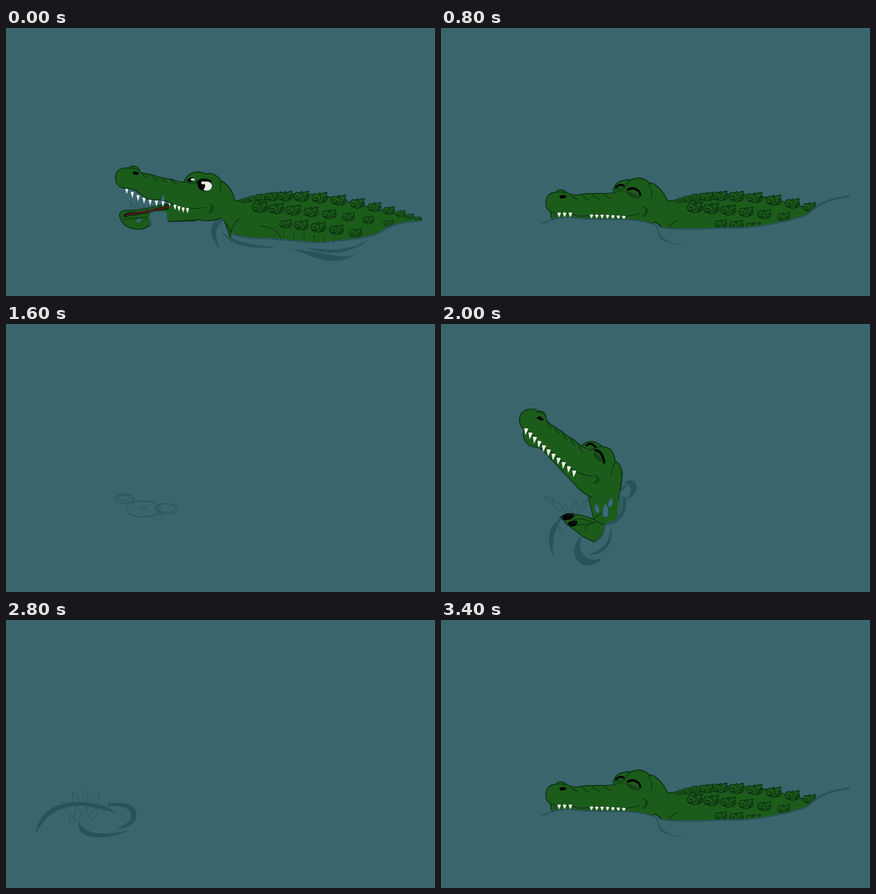
Write an HTML page that moves like this. It is 650 px wide and 406 px high and loops after 3600 ms.

```html
<!DOCTYPE html>
<html lang="en">
<head>
<meta charset="utf-8">
<title>Crocodile</title>
<style>
html, body { margin: 0; width: 100%; height: 100%; overflow: hidden; background: #3a656d; }
svg { display: block; width: 100vw; height: 100vh; }
</style>
</head>
<body>
<svg id="stage" viewBox="0 0 650 406"></svg>
<script>
const WATER = '#3a656d', WAVE = '#285359', SKIN = '#1c5c1a', INK = '#0b3013', DROP = '#3e6b7b';
const STEP = 200;

const shape = (d, fill = SKIN, stroke = 'none', w = 1.3) =>
  `<path d="${d}" fill="${fill}" stroke="${stroke}" stroke-width="${w}" stroke-linejoin="round" stroke-linecap="round"/>`;
const skin = d => shape(d, SKIN, INK, 1.4);
const line = (d, w = 1.1, color = INK) => shape(d, 'none', color, w);
const wave = d => shape(d, WAVE);
const move = (t, s) => `<g transform="${t}">${s}</g>`;
const blob = (x, y, rx, ry, fill, r = 0) =>
  `<ellipse cx="${x}" cy="${y}" rx="${rx}" ry="${ry}" fill="${fill}" transform="rotate(${r} ${x} ${y})"/>`;

// Places n parts along the curve from a to b that bends towards c
const even = t => t;
const bunched = t => t - 0.08 * Math.sin(2 * Math.PI * t);
function row(n, a, c, b, part, ease = even) {
  let out = '';
  for (let i = 0; i < n; i++) {
    const t = i / (n - 1), u = ease(t);
    const at = k => (1 - u) ** 2 * a[k] + 2 * u * (1 - u) * c[k] + u * u * b[k];
    out += part(at(0), at(1), t, i);
  }
  return out;
}
const bulge = (ends, mid) => t => ends + (mid - ends) * Math.sin(Math.PI * t);

// Drops are 20 units long and point upwards
const drop = fill => (x, y, s = 1, r = 0) =>
  move(`translate(${x} ${y}) rotate(${r}) scale(${s})`,
    shape('M0,-10C4,-4 5,2 4,6C3,11 -3,11 -4,6C-5,2 -3,-4 0,-10Z', fill, WAVE, 0.9 / s));
const wet = drop(DROP), clear = drop('none');
const fan = (kind, size, r0, r1) => (x, y, t, i) => kind(x, y, size * (i % 2 ? 1.25 : 0.9), r0 + (r1 - r0) * t);

const tooth = (w, h, r = 0) => (x, y) =>
  move(`translate(${x} ${y}) rotate(${r})`, shape(`M${-w / 2},-2Q0,-3 ${w / 2},-2L0,${h}Z`, '#eef0e8'));
const fold = (dx, dy) => (x, y) => line(`M${x},${y}q${dx * 0.3},${dy * 0.8} ${dx},${dy}`);

const plate = (x, y, s, r = 0) =>
  move(`translate(${x} ${y}) rotate(${r}) scale(${s})`,
    skin('M-12,0C-11,-6 -7,-8 -3,-5L0,-8L2,-5Q5,-8 11,-8L9,-4C14,1 10,7 2,7Q-1,9 -5,6Q-10,7 -12,0Z') +
    line('M-9,4Q-5,5 -3,1Q-6,-2 -9,0M-3,-5Q3,-3 2,1Q0,5 -5,5M3,5Q9,5 9,-3M5,3Q7,1 6,-2', 1.4));
const plates = (size, r = 0) => (x, y, t) => plate(x, y, size(t), r);

// Floating back, seen from the side
const back =
  skin('M344,262C365,260 385,256 405,254C430,250 460,250 490,256C525,264 560,275 600,284Q615,287 629,288Q631,291 628,293L590,330L350,345L330,290') +
  row(15, [358, 262], [460, 239], [624, 289], plates(bulge(.4, 1)), bunched) +
  row(8, [385, 272], [470, 277], [580, 296], plates(t => 1 - .35 * t * t)) +
  row(5, [424, 297], [470, 300], [530, 311], plates(bulge(.8, .95)));
const creases = line('M341,311Q342,297 354,289M386,300Q410,302 417,319') +
  row(6, [421, 308], [460, 313], [497, 317], (x, y) => line(`M${x},${y}q-1,5 0,9`, .8));

const surface = 'M342,311C352,317 372,319 395,319C425,320 450,325 475,325C512,322 548,319 566,310C580,300 596,294 629,292';
const openWater = shape(surface + 'L650,292V406H300V345L342,345Z', WATER) + line(surface, 2.4, WAVE);
const openWaves = wave('M327,289C311,293 302,305 323,335C316,312 317,302 330,291Z') +
  wave('M326,308C340,331 372,335 411,332C380,329 350,327 326,308Z') +
  wave('M425,334C450,337 468,354 500,353Q518,352 526,344C505,351 475,337 425,334Z') +
  wave('M455,332C480,347 532,342 551,318C530,336 490,339 455,332Z');

const cheek = line('M307,266Q317,267 312,277Q310,281 306,280M311,269Q313,274 309,277');

const roarHead =
  shape('M172,285C171,276 181,276 190,276C210,276 230,267 255,266L302,272L288,292L245,293L219,298C207,309 181,307 174,290Z', SKIN, INK) +
  shape('M178,285C180,278 192,279 200,279C222,276 238,269 256,267L254,273C230,276 205,283 187,284Q180,288 178,285Z', '#08200f', INK) +
  line('M181,285C190,279 212,280 222,276Q238,273 252,270', 2, '#671719') +
  line('M178,291C192,287 207,287 218,287', 1.2) +
  shape('M219,279Q232,275 246,279Q241,287 247,296L253,302L218,302Q221,294 216,289Z', WATER) +
  wave('M218,287Q222,296 219,302Q216,294 218,287ZM245,281Q243,294 253,302Q246,297 243,288Z') +
  row(8, [183, 245], [212, 267], [248, 264], tooth(5, 7)) +
  skin('M341,309Q337,297 325,288C315,293 302,293 288,290L262,292L272,278L250,266C240,258 226,261 214,259C203,253 198,243 184,243C173,243 166,238 166,228C165,216 174,211 186,212C190,208 200,208 202,215Q203,219 208,220C225,222 235,228 251,229Q262,234 270,233C272,225 280,218 290,218Q297,218 302,221C312,218 322,224 326,232C338,237 344,250 347,262') +
  shape('M250,266Q266,276 302,272Q306,285 288,290L246,293L244,279Z') +
  line('M246,293Q268,294 288,290M250,266C262,273 282,275 302,272') +
  row(4, [256, 270], [265, 274], [275, 275], tooth(5, 6)) +
  cheek + line('M326,232Q323,242 326,251M270,233Q279,236 287,236M187,213Q195,211 202,216') +
  row(4, [206, 220], [228, 225], [250, 229], fold(9, 7)) +
  blob(196.5, 220, 4.8, 2.4, '#000', 10) +
  blob(280, 230, 6, 3.2, '#06120a', -12) + blob(283, 229.5, 3, 1.8, '#e8ebe6') +
  blob(301, 238, 11, 9, '#07130b', 8) + blob(304, 239.5, 8, 7, '#eceeea') +
  blob(296.5, 238, 5, 7.3, '#000', -12) + blob(298.5, 234.5, 2.6, 2.2, '#fff') +
  line('M289,234Q297,225 311,232', 2.4, '#041208') +
  wet(238, 257, .55, 10) + wet(202, 291, .5, 60) +
  row(4, [190, 267], [200, 275], [222, 272], fan(clear, .45, -30, 50));

const calmHead =
  skin('M341,309Q336,300 324,294C305,304 285,300 245,299C215,300 182,304 170,291Q165,286 167,279C161,276 159,272 159,266C158,254 166,249 174,249C177,244 186,244 190,249Q197,253 207,253C225,249 242,252 261,250C261,238 268,231 278,231Q283,229 288,230C297,225 309,227 314,234C329,236 336,248 344,262') +
  line('M165,279C180,283 190,279 200,282C211,289 225,282 240,283C262,285 285,287 300,281', 1.2) +
  row(3, [179, 282], [187, 282], [196, 282], tooth(6, 5)) +
  row(7, [228, 285], [252, 285], [277, 287], tooth(6, 4)) +
  move('translate(-1 5)', cheek) +
  line('M314,235Q320,244 319,257M261,250Q268,248 276,246M277,244Q280,236 288,230M175,249Q183,247 190,250') +
  row(4, [196, 252], [222, 254], [247, 251], fold(11, 7)) +
  shape('M179,255Q185,251 191,255Q187,259 181,258Z', '#000') +
  line('M265,242Q271,235 277,239', 3, '#000') + line('M265,246Q271,242 277,242', 1) +
  line('M283,245C291,240 301,245 302,253', 3.6, '#000') +
  shape('M280,248Q290,249 301,257Q289,260 280,248Z', '#14461a', INK, .7);

const lowLine = 'M153,297C165,290 180,286 195,287C220,291 250,289 280,290C302,291 316,294 326,300C345,307 390,304 430,303C475,305 530,292 552,284C566,276 572,260 618,255';
const low = back + calmHead + line('M346,302Q349,295 358,291') +
  shape(lowLine + 'L650,255V406H140V297Z', WATER) + line(lowLine, 2.2, WAVE) +
  line('M565,274Q582,259 617,255.5', 3, WAVE) +
  wave('M324,298C333,303 327,310 337,318C346,325 356,328 373,327C352,330 332,323 329,314Q328,304 324,298Z');

const eyeLine = 'M132,281C150,270 175,270 200,271C235,273 270,267 295,270C320,274 333,265 346,260';
const eyes = calmHead + shape(eyeLine + 'L380,262V406H120V281Z', WATER) + line(eyeLine, 2, WAVE) +
  wave('M344,260C353,266 341,279 367,289C339,284 345,270 340,263Z');

// Raised head with closed eyes; the outline starts at the throat
const raisedHead = throat =>
  skin(throat + 'C160,196 152,187 147,180C130,160 114,140 100,124C95,119 87,121 81,116C73,110 72,100 75,92Q70,89 69,80C68,68 76,61 88,62Q94,62 98,66C105,64 110,70 109,78C112,85 118,89 123,92C131,97 137,104 144,109C151,113 156,118 160,123C166,116 174,115 182,118Q188,121 192,125C203,126 209,134 210,148C218,152 220,163 218,175C216,190 214,197 211,204') +
  line('M75,91C86,94 87,106 94,113C106,121 120,133 132,147C145,158 158,167 174,169', 1.4) +
  row(11, [78, 93], [108, 127], [147, 161], tooth(6.5, 8, 12)) +
  line('M178,168Q186,170 183,177Q180,180 175,179M180,171Q183,175 179,177') +
  line('M210,149Q205,157 202,168M160,123Q168,127 175,129M173,130Q181,124 192,125M95,68Q102,65 107,72') +
  row(5, [110, 81], [133, 98], [156, 119], fold(6, 12)) +
  shape('M95,76Q100,70 106,80Q100,81 95,76Z', '#000') +
  line('M168,122Q175,116 181,125', 3.2, '#000') +
  line('M181,130C189,131 193,140 193,149', 3.8, '#000') +
  shape('M179,134Q190,139 189,147Q179,145 179,134Z', '#14461a', INK, .7);

const claws = (x, y) => move(`translate(${x} ${y})`,
  shape('M-12,0Q-8,-6 1,-7L10,-7Q12,-3 4,2Q-5,5 -12,0ZM0,8Q4,3 14,4Q17,9 9,13Q2,13 0,8Z', '#000', INK, .6) +
  line('M-4,-3Q1,-5 7,-4M4,7L12,7', .6, '#344134'));
const knuckles = (x, y) => move(`translate(${x} ${y})`,
  line('M0,0Q15,-3 31,6M5,9Q14,5 23,10M16,11l3,5M34,4Q25,8 20,6'));

const farArm = skin('M174,258L156,256C153,266 146,267 140,264C132,261 127,254 124,250C112,244 98,243 86,241L75,230L85,221L95,222C105,228 118,230 128,228C145,227 155,232 174,234') +
  knuckles(89, 228) + line('M154,257Q155,249 150,243') + claws(75, 229);
const nearArm = skin('M223,303C212,309 190,309 165,303C167,318 157,327 145,322C134,315 126,303 118,297C110,293 100,291 90,287L80,274L90,266C104,267 117,273 130,280C151,280 170,278 190,279') +
  knuckles(95, 274) + line('M219,272Q216,292 224,303') + claws(81, 272);

const torso = skin('M179,231C169,236 168,251 175,264Q181,278 193,283L205,308L222,390L350,370L325,293L311,278C298,263 287,253 273,243C250,229 230,217 211,203L179,210') +
  row(8, [219, 209], [277, 237], [314, 286], plates(t => .55 + .2 * t, 38)) +
  row(5, [232, 237], [270, 266], [305, 301], plates(() => .85, 38)) +
  row(4, [243, 279], [278, 300], [304, 320], plates(() => .85, 33)) +
  row(4, [231, 300], [250, 314], [276, 327], plates(() => .75, 30)) +
  row(2, [231, 327], [242, 332], [254, 337], plates(() => .7, 20));
const upper = farArm + torso + raisedHead('M179,232C181,219 180,207 174,202') +
  shape('M178,210L210,204L212,235L176,237Z') + line('M179,210Q181,223 178,232') + nearArm;

const poolLine = 'M211,326C222,343 242,347 260,347C300,344 320,318 325,292';
const pool = shape(poolLine + 'L400,280V406H150V346L203,332Z', WATER) +
  wave('M331,279C345,292 340,315 320,326C334,309 336,296 331,279Z') +
  wave('M216,350C237,366 272,363 290,346C267,357 240,358 216,350Z') +
  wave('M194,344C199,367 232,378 270,364C235,367 209,362 194,344Z') +
  wave('M192,371C180,345 187,319 211,307C197,325 189,342 192,371Z') +
  wave('M299,346Q326,338 333,314Q323,333 299,346Z') +
  row(7, [153, 328], [215, 320], [295, 310], fan(wet, 1, -60, 20)) +
  row(7, [171, 303], [245, 303], [315, 287], fan(wet, .9, -55, 15)) + wet(267, 276, .8, -25) +
  row(2, [159, 227], [162, 240], [166, 260], fan(clear, .7, -15, -30)) +
  row(2, [301, 227], [302, 240], [303, 260], fan(clear, .9, -8, 15)) +
  line('M268,238Q276,229 296,252', .9, WAVE);

const rise =
  shape('M223,262C227,276 228,286 232,297L247,305L267,295Q269,270 275,222L224,245Z') +
  line('M223,262C227,276 228,286 232,297M275,224Q274,242 270,259') +
  move('translate(50 68) rotate(-3.4 69 77)', raisedHead('M174,202')) +
  shape('M226,264L269,250L266,272L230,280Z') +
  skin('M232,330Q216,324 205,314L191,304L184,295L193,289C207,287 220,291 232,296Q242,302 248,304Q249,320 232,330') +
  knuckles(201, 296) + line('M232,296Q238,288 246,286') + claws(192, 294) +
  line('M271,255C270,272 276,282 265,297Q251,301 247,306Q250,320 232,331', 2, WAVE) +
  wave('M171,355C158,325 162,304 186,291C171,312 167,327 171,355Z') +
  wave('M277,240C290,233 297,238 296,250Q292,263 281,265C290,255 291,245 277,240ZM270,257Q274,243 281,243Q278,252 270,257Z') +
  wave('M280,262C285,286 272,304 248,305C271,296 278,282 274,261Z') +
  wave('M257,307C264,331 249,350 223,350C246,341 256,330 257,307Z') +
  wave('M214,319C193,340 202,366 223,366Q237,364 244,355C218,363 204,343 214,319Z') +
  row(3, [236, 279], [252, 290], [257, 270], fan(wet, .85, -15, 12)) +
  row(5, [163, 265], [188, 290], [217, 273], fan(clear, .85, -60, 30)) + clear(182, 313, .7, -40);

const swirls = wave('M45,324C49,291 74,276 110,276C136,277 157,282 169,294C150,287 131,282 110,281C75,283 58,300 45,324Z') +
  wave('M154,279C181,273 198,281 198,296C197,309 186,315 167,316C186,309 193,300 188,291C184,283 170,281 154,282Z') +
  wave('M110,305C118,325 146,327 186,319C151,334 112,333 110,313Z');
const burst = kind => row(5, [90, 282], [120, 253], [151, 282], fan(kind, .98, -40, 40)) +
  row(4, [99, 301], [112, 284], [133, 293], fan(kind, .85, -20, 38));

const dive = skin('M82,322C84,275 96,232 121,193Q139,162 166,135C166,162 156,190 147,222C140,252 142,285 146,325') +
  row(6, [159, 158], [138, 210], [136, 272], plates(t => .4 + .45 * t, 102)) +
  row(4, [132, 194], [112, 235], [108, 277], plates(t => .5 + .35 * t, 100)) +
  shape('M78,304Q112,325 151,302V345H74Z', WATER) +
  move('translate(-37.5 -42) scale(1.19 1.255)', swirls) + move('translate(-3 20)', burst(wet));

// Each ripple: centre, outer radius, its growth, inner radius
const ripples = [[180, 264.6, 14.5, -2, 8.7], [207.7, 280.3, 26.2, -5, 5.7], [243.5, 280, 17.2, 6.5, 14], [229, 292.6, 8.8, -2, 3]];
const ring = (x, y, r, w) =>
  `<ellipse cx="${x}" cy="${y}" rx="${r}" ry="${r * .46}" fill="none" stroke="${WAVE}" stroke-width="${w}"/>`;
const rings = grow => ripples.map(([x, y, r, g, inner]) =>
  ring(x, y, r + g * grow, r > 10 ? 1.3 : .7) + (r > 10 ? ring(x - .8, y - 1.2, inner + 3 * grow, .9) : '')).join('');

const poses = {
  open: back + roarHead + openWater + creases + openWaves,
  shut: back + move('translate(-2 0)', calmHead) + openWater + creases + move('translate(0 -3)', openWaves),
  low, eyes,
  ringA: rings(0),
  ringB: rings(1),
  rise,
  tall: move('translate(8 -10) rotate(6 270 320)', upper) + move('translate(11 9)', pool),
  lean: upper + pool,
  dive,
  splash: swirls + burst(clear),
  none: ''
};
const order = 'open shut open shut low eyes ringA ringB ringA ringB rise tall lean dive splash none eyes low'.split(' ');

const stage = document.getElementById('stage');
stage.innerHTML = Object.keys(poses).map(k => `<g id="${k}" display="none">${poses[k]}</g>`).join('');
const layers = Object.fromEntries(Object.keys(poses).map(k => [k, document.getElementById(k)]));

let current = 'none';
function draw(time) {
  const next = order[Math.floor(time / STEP) % order.length];
  if (next === current) return;
  layers[current].setAttribute('display', 'none');
  layers[next].setAttribute('display', 'inline');
  current = next;
}

const start = performance.now();
function tick() {
  draw(performance.now() - start);
  requestAnimationFrame(tick);
}
draw(0);
requestAnimationFrame(tick);
</script>
</body>
</html>
```
